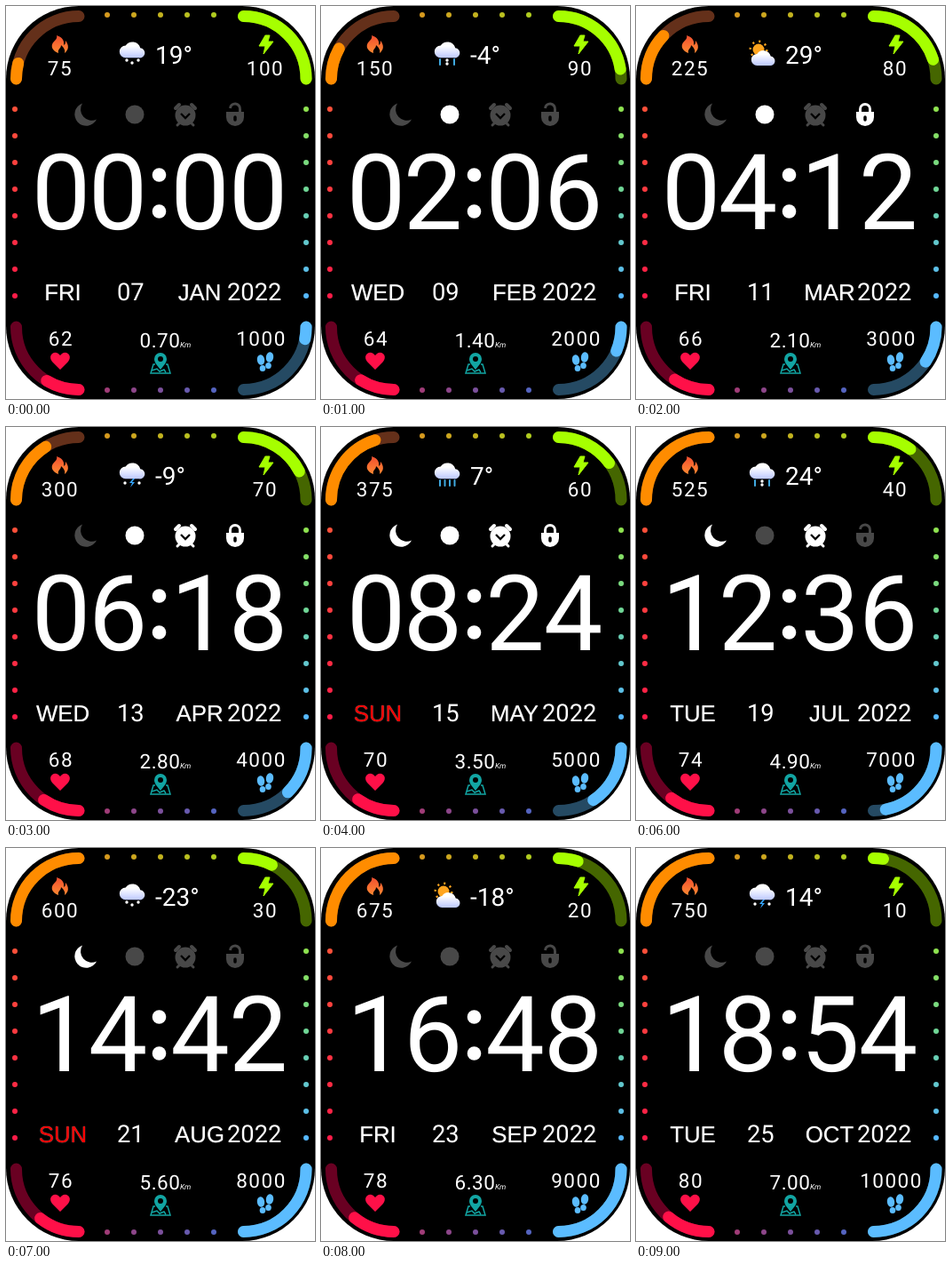
Animation of 348 by 442 pixels, one loop 10000 ms. Source, as an HTML page:

```html
<!DOCTYPE html>
<html lang="en">
<head>
<meta charset="utf-8">
<title>Watch face</title>
<style>
  html, body { margin: 0; width: 100%; height: 100%; overflow: hidden; background: #fff; }
  svg { display: block; width: 348px; height: 442px; }
  text { font-family: Roboto, sans-serif; fill: #fff; text-rendering: geometricPrecision; }
  .mid text, .big text, .names text { text-anchor: middle; }
  .big { font-size: 118.5px; }
  .small { font-size: 22.5px; letter-spacing: 1.5px; }
  .date { font-size: 27.3px; }
  .names text { font: 25.8px "Liberation Sans", Arial, sans-serif; text-shadow: 0 0 1px #999; }
  .arcs path { fill: none; stroke-width: 13; stroke-linecap: round; }
  .status > g { color: #484848; fill: currentColor; }
  .status > .on { color: #fff; }
  .line { fill: none; stroke: currentColor; }
  #lock .closed, #lock.on .open { display: none; }
  #lock.on .closed { display: inline; }
</style>
</head>
<body>
<svg viewBox="0 0 348 442">
  <defs>
    <linearGradient id="cloudFill" x1="0" y1="0" x2="0" y2="1">
      <stop offset=".25" stop-color="#fff"/><stop offset="1" stop-color="#bcc8ff"/>
    </linearGradient>
    <linearGradient id="flameFill" x1="0" y1="0" x2="0" y2="1">
      <stop offset="0" stop-color="#f04e30"/><stop offset="1" stop-color="#ff8a32"/>
    </linearGradient>
    <path id="cloud" fill="url(#cloudFill)" d="M-9 8h17a6 6 0 0 0 1-12a10 10 0 0 0-18-3a7.5 7.5 0 0 0 0 15z"/>
  </defs>
  <rect width="348" height="442" rx="82"/>
  <g id="dots"></g>
  <g id="arcs" class="arcs"></g>

  <path fill="url(#flameFill)" d="M57 33c7 2 9 7 8 11c2-1 2-3 2-5c4 5 4 10-1 14c1-4-1-6-4-9c0 4-4 4-3 9c-8-3-9-9-5-13c2-2 4-4 3-7z"/>
  <path fill="#a6ff00" stroke="#a6ff00" stroke-linejoin="round" d="M292 33h5l-2 7h6l-11 14 2-9h-7z"/>
  <path fill="#ff1048" d="M61 409l-9-9c-5-6 1-13 7-9l2 2 2-2c6-4 12 3 7 9z"/>
  <g color="#12a5a3" fill="currentColor">
    <path fill-rule="evenodd" d="M174 409c-4-5-7-8-7-12a7 7 0 0 1 14 0c0 4-3 7-7 12zM174 400a3 3 0 1 0 0-6a3 3 0 0 0 0 6z"/>
    <path class="line" stroke-width="1.5" d="M168 403h-2l-3 10h22l-3-10h-2M164 410l6-2 3 3 5-2 2 3"/>
  </g>
  <g fill="#5bbcff">
    <ellipse cx="287" cy="398" rx="4.2" ry="5.8" transform="rotate(-8 287 398)"/>
    <ellipse cx="289" cy="407.5" rx="3.3" ry="3.5"/>
    <ellipse cx="297" cy="395" rx="4.2" ry="5.8" transform="rotate(8 297 395)"/>
    <ellipse cx="295.5" cy="404.5" rx="3.3" ry="3.5"/>
  </g>

  <g class="status">
    <g id="moon"><path d="M86 109.5a13 13 0 1 0 16 18a12.5 12.5 0 0 1-16-18z"/></g>
    <g id="link"><circle cx="145" cy="122" r="10.5"/></g>
    <g id="alarm">
      <circle cx="202" cy="123" r="11.5"/>
      <path class="line" stroke-width="4" stroke-linecap="round" d="M191 115l4-4M213 115l-4-4"/>
      <path class="line" stroke-width="3" stroke-linecap="round" d="M195 132l-2 2M209 132l2 2"/>
      <path fill="none" stroke="#000" stroke-width="2.3" d="M197 121l5 5 5-5"/>
    </g>
    <g id="lock">
      <path d="M248 119h20v6a10 10 0 0 1-20 0z"/>
      <path class="line closed" stroke-width="3" d="M252.5 120v-4a5.5 5.5 0 0 1 11 0v4"/>
      <path class="line open" stroke-width="3" d="M263.500 120v-4a5.500 5.500 0 0 0-11-1"/>
      <path fill="none" stroke="#000" stroke-width="3.5" stroke-linecap="round" d="M258 125v3"/>
    </g>
  </g>

  <g id="weather"></g>
  <text id="temp" x="168" y="65" font-size="28"></text>

  <g class="big">
    <text id="h1" x="62" y="250.500"></text><text id="h0" x="126" y="250.500"></text>
    <text id="m1" x="218.500" y="250.500"></text><text id="m0" x="284" y="250.500"></text>
  </g>
  <circle cx="172.500" cy="190" r="7.800" fill="#fff"/>
  <circle cx="172.500" cy="231" r="7.800" fill="#fff"/>

  <g class="names">
    <text id="weekday" x="64" y="331"></text><text id="month" x="218" y="331"></text>
  </g>
  <g class="date">
    <text id="day" x="125" y="331"></text><text x="249" y="331">2022</text>
  </g>
  <g class="small mid">
    <text id="calories" x="61" y="77.500"></text><text id="battery" x="292" y="77.500"></text>
    <text id="pulse" x="62" y="382"></text><text id="steps" x="287.500" y="382"></text>
  </g>
  <text id="km" x="150.500" y="383.500" font-size="22.500" letter-spacing=".5"></text>
  <text x="196" y="384" font-size="8.500" font-style="italic">Km</text>
</svg>
<script>
  const $ = id => document.getElementById(id);

  const mix = (from, to, t) => `rgb(${from.map((c, k) => Math.round(c + (to[k] - c) * t))})`;
  function dotRow(count, x, y, dx, dy, from, to) {
    for (let k = 0; k < count; k++)
      $('dots').innerHTML += `<circle cx="${x + dx * k}" cy="${y + dy * k}" r="3" fill="${mix(from, to, k / (count - 1))}"/>`;
  }
  dotRow(5, 114, 10, 30, 0, [214, 154, 30], [176, 204, 32]);
  dotRow(5, 114, 432, 30, 0, [160, 60, 120], [85, 100, 192]);
  dotRow(8, 10, 116, 0, 30, [255, 80, 58], [255, 28, 72]);
  dotRow(4, 338, 116, 0, 30, [142, 226, 80], [112, 214, 150]);
  dotRow(4, 338, 236, 0, 30, [104, 206, 180], [86, 184, 255]);

  const gauges = {
    calories: ['M11.5 82A70.5 70.5 0 0 1 82 11.5', '#64301a', '#ff8c00', 465],
    battery: ['M267.5 11.5A70.5 70.5 0 0 1 338 82', '#456600', '#a6ff00', 100],
    pulse: ['M82 431.5A70.5 70.5 0 0 1 11.5 361', '#690022', '#ff1048', 180],
    steps: ['M338 361A70.5 70.5 0 0 1 267.5 431.5', '#254a63', '#5bbcff', 8000]
  };
  for (const [name, [d, dim, bright]] of Object.entries(gauges))
    $('arcs').innerHTML += `<path d="${d}" stroke="${dim}"/><path id="${name}Arc" d="${d}" stroke="${bright}" pathLength="100"/>`;

  const cloud = (x = 143, y = 51, s = .92) => `<use href="#cloud" transform="translate(${x} ${y}) scale(${s})"/>`;
  const flakes = (...spots) => spots.map(([x, y]) => `<circle cx="${x}" cy="${y}" r="1.7" fill="#fff"/>`).join('');
  const rain = (...xs) => xs.map(x => `<path d="M${x} 60v6" stroke="#3fa9e0" stroke-width="2" stroke-linecap="round"/>`).join('');
  const sun = `<circle cx="138" cy="49" r="6.5" fill="#ffa51f"/>
    <circle cx="138" cy="49" r="9.3" fill="none" stroke="#ffa51f" stroke-width="2.4" stroke-dasharray="2 5.3"/>`;
  const sky = {
    snow: cloud() + flakes([136, 61], [142, 64], [149, 61]),
    sleet: cloud() + rain(134, 150) + flakes([142, 61], [142, 65]),
    fair: sun + cloud(144, 60, .86),
    rain: cloud() + rain(134, 139.5, 145, 150.5),
    flurry: sun + cloud(143, 56, .76) + flakes([142, 66]),
    storm: cloud() + flakes([134, 63], [150, 63]) + '<path d="M143 58l-4 5h3l-2 5 5-6h-3l3-4z" fill="#35a7ff"/>'
  };
  const weather = [
    ['snow', 19], ['sleet', -4], ['fair', 29], ['storm', -9], ['rain', 7],
    ['flurry', -14], ['sleet', 24], ['snow', -23], ['fair', -18], ['storm', 14]
  ];
  const weekdays = 'FRI WED FRI WED SUN FRI TUE SUN FRI TUE'.split(' ');
  const months = 'JAN FEB MAR APR MAY JUN JUL AUG SEP OCT'.split(' ');
  const switchOn = { link: 1, lock: 2, alarm: 3, moon: 4 };
  const pad = n => String(n).padStart(2, '0');

  function show(i) {
    const values = { calories: 75 * (i + 1), battery: 100 - 10 * i, pulse: 62 + 2 * i, steps: 1000 * (i + 1) };
    for (const [name, value] of Object.entries(values)) {
      $(name).textContent = value;
      $(name + 'Arc').setAttribute('stroke-dasharray', `${Math.min(100, 100 * value / gauges[name][3])} 300`);
    }
    const clock = pad(2 * i) + pad(6 * i);
    ['h1', 'h0', 'm1', 'm0'].forEach((id, k) => $(id).textContent = clock[k]);
    $('km').textContent = (.7 * (i + 1)).toFixed(2);
    $('day').textContent = pad(7 + 2 * i);
    $('month').textContent = months[i];
    $('weekday').textContent = weekdays[i];
    $('weekday').style.fill = weekdays[i] === 'SUN' ? '#f00' : '#fff';
    $('weather').innerHTML = sky[weather[i][0]];
    $('temp').textContent = weather[i][1] + '°';
    // Each indicator stays lit for four seconds.
    for (const [id, start] of Object.entries(switchOn))
      $(id).classList.toggle('on', i >= start && i < start + 4);
  }

  let shown = -1;
  function tick() {
    const i = Math.floor(performance.now() / 1000) % 10;
    if (i !== shown) show(shown = i);
    requestAnimationFrame(tick);
  }
  tick();
</script>
</body>
</html>
```
